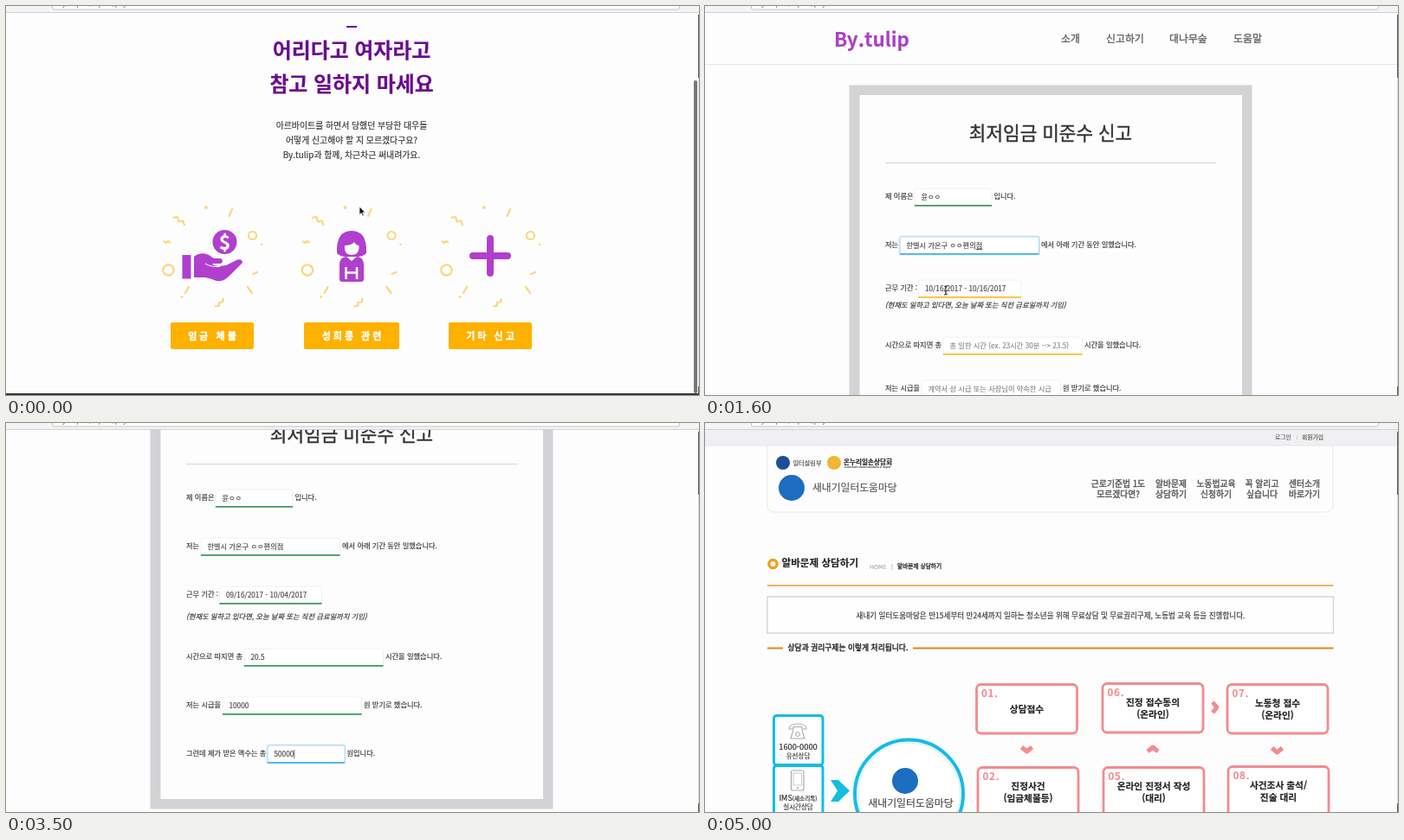
Animation, 800 px wide and 450 px high, one loop 5.1 s. Source, as an HTML page:

```html
<!DOCTYPE html>
<html lang="ko">
<head>
<meta charset="utf-8">
<title>신고서 작성</title>
<style>
html, body { margin: 0; width: 100%; height: 100%; overflow: hidden; background: #fefdfe; }
svg { display: block; width: 800px; height: 450px; font-family: "Noto Sans CJK KR", "Noto Sans", sans-serif; }
text { white-space: pre; stroke-width: .15px; stroke-linejoin: round; }
.m { text-anchor: middle; }
.b { font-weight: 700; }
.w { stroke-width: .4px; }
.i { font-style: italic; }
.s { letter-spacing: 3px; }
.h { font-family: "Liberation Sans", Arial, sans-serif; stroke-width: 0; }
</style>
</head>
<body>
<svg id="stage" viewBox="0 0 800 450"></svg>
<script>
const LOOP = 5100, STEP = 100;
const stage = document.getElementById('stage');
const SITE = 'By.tulip', CENTER = '새내기일터도움마당';
const PERSON = '윤ㅇㅇ', SHOP = '한별시 가온구 ㅇㅇ편의점';
const PURPLE = '#b03fce', AMBER = '#ffb100', PINK = '#f48a8e', CYAN = '#14bde2', INK = '#333';

// Drawing helpers; text is placed by its vertical centre.
const text = (x, y, s, size, fill = INK, cls = '') =>
  `<text x="${x}" y="${y + size * .37}" font-size="${size}" fill="${fill}" stroke="${fill}" class="${cls}">${s}</text>`;
const rect = (x, y, w, h, fill, r = 0, stroke = 'none', sw = 1) =>
  `<rect x="${x}" y="${y}" width="${w}" height="${h}" rx="${r}" fill="${fill}" stroke="${stroke}" stroke-width="${sw}"/>`;
const disc = (x, y, r, fill, stroke = 'none', sw = 1) =>
  `<circle cx="${x}" cy="${y}" r="${r}" fill="${fill}" stroke="${stroke}" stroke-width="${sw}"/>`;
const line = (d, stroke, sw = 1, cap = 'butt') =>
  `<path d="${d}" fill="none" stroke="${stroke}" stroke-width="${sw}" stroke-linecap="${cap}" stroke-linejoin="round"/>`;
const shape = (d, fill) => `<path d="${d}" fill="${fill}"/>`;
const move = (x, y, s) => `<g transform="translate(${x} ${y})">${s}</g>`;

// Linear value between keys [time, ...numbers].
function between(keys, t) {
  let i = keys.length - 1;
  while (i > 0 && keys[i][0] > t) i--;
  const a = keys[i], b = keys[i + 1] || a;
  const k = b === a ? 0 : Math.max(0, (t - a[0]) / (b[0] - a[0]));
  return { row: a, v: [1, 2].map(n => a[n] + (b[n] - a[n]) * k) };
}

const typed = (s, from, to, t) =>
  t < from ? '' : s.slice(0, Math.ceil(s.length * Math.min(1, (t - from + STEP) / (to - from + STEP))));

function chrome() {
  return rect(0, 0, 800, 7, '#f5f4f5') +
    rect(53.5, -10, 724, 14, '#fff', 2, '#c4c4c4') +
    text(60, -3, 'bytulip.kr/report/pay', 8, '#777') +
    line('M0 7.5H800', '#d0d0d2') +
    line('M799.5 10V83M799.5 440V450', '#555') + line('M799.5 83V440', '#ddd');
}

function header() {
  return text(149, 38.5, SITE, 22.4, '#a93fc6', 'b') +
    [[411, '소개'], [463, '신고하기'], [536, '대나무숲'], [610, '도움말']]
      .map(([x, s]) => text(x, 38, s, 11.9, '#666', 'w')).join('') +
    line('M0 67.5H799', '#e3e3e5');
}

function button(x, y, w, s, filled = true) {
  return rect(x, y, w, 31, filled ? AMBER : '#fff', 2, filled ? 'none' : '#f9b945', 1.4) +
    text(x + w / 2 + 1.5, y + 15.5, s, 11, filled ? '#fff' : INK, filled ? 'm b s w' : 'm b s');
}

const confetti = () => {
  const c = '#fcd67c';
  return disc(231, 233, 2, c) + disc(295, 276, 1.3, c) + disc(203, 336.5, 1.4, c) +
    disc(284.5, 265.5, 4.6, 'none', c, 2) + disc(187.5, 305.5, 6.2, 'none', c, 2.2) +
    line('M261 235L257.5 243M211 325L207 332M279 325L284 332M285 310L290 308', c, 2.2, 'round') +
    line('M192.5 245L198 244L199.5 249.5L204.5 248.5L206 254M182 272L185 274L187 272L190 274M241 347.5L245.5 347L246 343L250 342.5L251 338', c, 2.2);
};

const hand = () =>
  rect(203.5, 288, 10, 27.5, PURPLE) +
  shape('M217 290C223 285 231 285 237 290L240 292H248Q252 295 248 298H238Q241 301 246 301L254 300L267 293.5Q273 292 273 297L257 313Q251 319 243 318Q236 315 230 314H217Z', PURPLE) +
  line('M230 298Q236 302 247 301.5', '#fff', 1) +
  disc(252.5, 273, 14, PURPLE) + text(252.5, 273, '$', 23, '#fff', 'm b');

const girl = () =>
  shape('M382 286Q381 260 399 260Q417 260 416 286Q412 290 406 290H392Q386 290 382 286Z', PURPLE) +
  shape('M391 277Q399 277 402 273Q404 277 407.5 277Q408 288 399 288Q390 288 391 277Z', '#fff') +
  shape('M385 300Q385 290 393 290L399 295L405 290Q413 290 413 300V316Q413 319 410 319H388Q385 319 385 316Z', PURPLE) +
  line('M392.5 302V316M405 302V316M392.5 308.5H405', '#fff', 2.6);

function intro() {
  return rect(393, 23, 12, 2, '#6a0b8c') +
    text(399, 51, '어리다고 여자라고', 23.9, '#6a0b8c', 'm b') +
    text(399, 90, '참고 일하지 마세요', 23.9, '#6a0b8c', 'm b') +
    ['아르바이트를 하면서 당했던 부당한 대우들', '어떻게 신고해야 할 지 모르겠다구요?', SITE + '과 함께, 차근차근 써내려가요.']
      .map((s, i) => text(399, 138 + 17 * i, s, 9.9, INK, 'm')).join('') +
    [0, 160.5, 321].map(x => move(x, 0, confetti())).join('') +
    hand() + girl() + line('M539 289H579M559 269V309', PURPLE, 8, 'round') +
    button(190, 366, 96, '임금 체불') + button(344, 366, 110, '성희롱 관련') + button(511, 366, 96, '기타 신고') +
    rect(794, 86, 4, 362, '#777', 2) + rect(0, 448, 800, 2, '#38383a');
}

// Form rows: "on" is focus, "done" is when the row turns green and pushes the rest down.
const ROWS = [
  { y: 220, x: 242, w: 89, label: '제 이름은', tail: '입니다.', hint: '이름', value: PERSON, on: 800, from: 900, to: 1100, done: 1200 },
  { y: 270, x: 225, w: 160.5, label: '저는', tail: '에서 아래 기간 동안 일했습니다.', hint: '지역+가게명 (ex.한별시 가온구 00편의점)', value: SHOP, on: 1200, from: 1300, to: 1600, done: 1700, ime: true },
  { y: 320, x: 246.5, w: 118, label: '근무 기간 :', date: true, on: 1700, done: 1800 },
  { y: 386, x: 275, w: 160.5, label: '시간으로 따지면 총', tail: '시간을 일했습니다.', hint: '총 일한 시간 (ex. 23시간 30분 --> 23.5)', value: '20.5', on: 2600, from: 2700, to: 2900, done: 3000 },
  { y: 436, x: 250, w: 160.5, label: '저는 시급을', tail: '원 받기로 했습니다.', hint: '계약서 상 시급 또는 사장님이 약속한 시급', value: '10000', on: 3000, from: 3100, to: 3200, done: 3300 },
  { y: 486, x: 302, w: 89, label: '그런데 제가 받은 액수는 총', tail: '원입니다.', hint: '받은 금액', value: '50000', on: 3300, from: 3400, to: 3500, done: 3700 }
];

function field(r, y, t) {
  const done = t >= r.done, focus = t >= r.on && !done;
  const edge = done ? '#3b9a5f' : focus ? '#4fb0e6' : '#fbc02d';
  let s = r.date ? (t < 2500 ? '10/16/2017 - 10/16/2017' : '09/16/2017 - 10/04/2017') : typed(r.value, r.from, r.to, t);
  const size = 8.22, tx = r.x + 7.5;
  let out = text(208, y, r.label, size) + text(r.x + r.w + 2.5, y, r.tail || '', size);
  out += focus
    ? rect(r.x, y - 9, r.w, 20, '#fff', 2, '#d3ecfa', 3) + rect(r.x, y - 9, r.w, 20, '#fff', 2, '#9fd4f2', .8)
    : rect(r.x, y - 9, r.w, 20, '#fff', 2, '#ececf0', .8);
  out += line(`M${r.x + .5} ${y + 10.8}h${r.w - 1}`, edge, 1.7, 'round');
  if (!s) return out + text(tx, y + 1, r.hint, size, '#888');
  if (focus && r.ime) s = s.slice(0, -1) + `<tspan text-decoration="underline">${s.slice(-1)}</tspan>`;
  out += text(tx, y + 1, s, size, '#444');
  if (focus && !r.ime && !r.date) {
    const w = [...s].reduce((n, c) => n + (c > '~' ? .92 : c === '.' ? .28 : .555), 0) * size;
    out += line(`M${tx + w + .5} ${y - 4}v10`, '#333', .7);
  }
  return out;
}

function form(t) {
  let push = 0, rows = '';
  for (const r of ROWS) {
    rows += field(r, r.y + push, t);
    if (t >= r.done) push += 6;
    if (r.date) rows += text(208, r.y + 19.5 + push, '(현재도 일하고 있다면, 오늘 날짜 또는 직전 급료일까지 기입)', 8.25, INK, 'i');
  }
  const scroll = between([[0, 0], [1700, 0], [1800, 84], [2500, 84], [2700, 134], [3700, 134], [3900, 190]], t).v[0];
  return move(0, -scroll, header() +
    rect(166.5, 91.5, 465, 459 + push, '#d3d2d5') + rect(178.5, 103, 441.5, 436 + push, '#fefdfe') +
    text(399, 147, '최저임금 미준수 신고', 21.3, INK, 'm w') + line('M208 181.5H590', '#d4d4d6') + rows) +
    (t >= 1800 && t < 2500 ? picker(t) : '');
}

const DAY = 864e5;
const day = (m, d) => Date.UTC(2017, m, d) / DAY;
const stamp = n => {
  const d = new Date(n * DAY), p = v => String(v).padStart(2, '0');
  return `${p(d.getUTCMonth() + 1)}/${p(d.getUTCDate())}/2017`;
};

function month(x, m, start, end) {
  const first = day(m, 1), lead = new Date(first * DAY).getUTCDay() || 7;
  const name = ['Sep', 'Oct', 'Nov'][m - 8];
  let out = text(x + 57, 298.5, name + ' 2017', 8.1, INK, 'm b h');
  'Su Mo Tu We Th Fr Sa'.split(' ').forEach((s, i) => out += text(x + 19 * i, 317, s, 8.1, INK, 'm b h'));
  for (let i = 0; i < 42; i++) {
    const n = first - lead + i, d = new Date(n * DAY);
    const cx = x + 19 * (i % 7), cy = 335.5 + 18.45 * Math.floor(i / 7);
    const off = d.getUTCMonth() !== m, pick = !off && (n === start || n === end);
    if (pick) out += rect(cx - 9.5, cy - 9.2, 19, 18.4, '#2276bd', 2);
    else if (!off && n > start && n < end) out += rect(cx - 9.5, cy - 9.2, 19.1, 18.5, '#e8f3f8');
    out += text(cx, cy, d.getUTCDate(), 8.1, pick ? '#fff' : off ? '#999' : INK, pick ? 'm b h' : 'm h');
  }
  return out;
}

function picker(t) {
  const m = t < 2000 ? 9 : 8;
  const start = t < 2100 ? day(9, 16) : day(8, 16);
  const end = t < 2100 ? day(9, 16) : t < 2300 ? start : day(9, 4);
  const input = (x, w, n, edge) => rect(x, 265.5, w, 17.5, '#fff', 2, edge) +
    rect(x + 5, 271, 8, 7.5, '#444', .5) + line(`M${x + 6.5} 269.5v2M${x + 11.5} 269.5v2`, '#444', 1.3) +
    line(`M${x + 5} 273h8`, '#fff', .6) + text(x + 17.5, 274.5, stamp(n), 8.5, '#444', 'h');
  return rect(247, 263, 368, 185, '#0001', 3) + rect(246.5, 261, 367, 184.5, '#fff', 3, '#c4c4c4') +
    shape('M251 261.6L255.5 257L260 261.6Z', '#fff') +
    input(251, 137.5, start, '#5aaee6') + input(396, 139, end, '#ccc') +
    rect(540, 265.5, 32, 17.5, '#20ad55', 2, '#17964a') + text(556, 274.3, 'Apply', 7.4, '#fff', 'm b h') +
    rect(574.5, 265.5, 34, 17.5, '#fff', 2, '#ccc') + text(591.5, 274.3, 'Cancel', 7.3, INK, 'm h') +
    line('M265.5 295.5L262 298.5L265.5 301.5M521.5 295.5L525 298.5L521.5 301.5', INK, 1.6) +
    month(264.5, m, start, end) + month(408, m + 1, start, end);
}

function result() {
  const lines = [
    `제 이름은 ${PERSON}입니다.`,
    `저는 ${SHOP}에서 2017년 9월 16일부터 2017년 10월 4일까지 일을 했습니다.`,
    '전체 20.5시간을 일했으며 약속한 시급은 10,000원이므로, 총 205,000원을 받아야 합니다.',
    '그런데 제가 받은 액수는 50,000원입니다.',
    `따라서 155,000원을 ${SHOP}(으)로부터 받을 수 있도록 선처해주세요.`
  ];
  const notes = [
    `아래 "신고하기" 버튼을 누르면 ${CENTER}의 온라인 상담신청 페이지로 연결됩니다.`,
    `적어주신 내용은 별도의 저장이 되지 않으니 "복사하기" 버튼을 눌러 작성된 내용을 복사하시고, ${CENTER} 페이지에서 온`,
    '라인 상담 신청시 적어야 하는 "내용" 칸에 붙여 넣어 주세요.'
  ];
  return header() + line('M330 115.5H166.5V267.5H631.5V115.5H468', '#fbb940', 1.6) +
    text(399.5, 118, '작성 내용', 20.4, '#fbac1c', 'm b s') +
    lines.map((s, i) => text(191, 163 + 19.1 * i, s, 9.37)).join('') +
    rect(166, 303, 466, 55.5, '#dbf2db', 2) +
    notes.map((s, i) => text(176, 319 + 12 * i, s, 8.24, '#3c763d', 'w')).join('') +
    button(284, 388, 92.5, '복사하기') + button(390.5, 388.5, 122, '신고하러 가기', false);
}

function step(x, y, no, ...lines) {
  return rect(x + 1.5, y + 1.5, 116, 56.5, '#fff', 5, PINK, 2.8) +
    `<g letter-spacing=".8">${text(x + 7, y + 11.5, no + '.', 11.5, PINK, 'b')}</g>` +
    lines.map((s, i) => text(x + 59.5, y + 30 + (i - (lines.length - 1) / 2) * 14.5, s, 10.7, '#222', 'm b')).join('');
}

const chevron = (x, y, turn) =>
  `<g transform="translate(${x} ${y}) rotate(${turn})">${line('M-6 -3L0 2L6 -3', PINK, 5)}</g>`;

function center() {
  const menu = [[477, '근로기준법 1도', '모르겠다면?'], [538, '알바문제', '상담하기'], [590, '노동법교육', '신청하기'],
    [643, '꼭 알리고', '싶습니다'], [692, '센터소개', '바로가기']];
  return rect(0, 8, 799, 18, '#f0eff1') + line('M0 26H799', '#e4e3e6') +
    text(658, 16, '로그인', 6.8, '#555') + text(683, 16, '|', 5, '#bbb') + text(689, 16, '회원가입', 6.8, '#555') +
    line('M72 26V95Q72 103 80 103H717Q725 103 725 95V26', '#e7e7ea') +
    disc(90, 46, 8, '#1d4f97') + text(101.5, 46, '일터살림부', 7.2, '#444') +
    disc(149, 46, 8, '#f2b632') + text(160, 45, '온누리일손상담회', 7.6, '#222', 'b') +
    text(160.5, 51, 'Onnuri Work Counsel Association of Helpers', 2.6, '#555') +
    disc(100, 75, 15, '#1d6dc0') + text(124, 75, CENTER, 11.8, '#555') +
    menu.map(([x, a, b]) => text(x, 70, a, 9.8, '#555', 'm w') + text(x, 82, b, 9.8, '#555', 'm w')).join('') +
    disc(78.5, 163, 4.6, '#fff', '#f2a01c', 3.4) + text(88.5, 162, '알바문제 상담하기', 11.6, '#222', 'b') +
    text(190, 166, 'HOME', 6.8, '#aaa') + text(215, 165.5, '|', 6.5, '#aaa') + text(222, 165.5, '알바문제 상담하기', 6.7, '#444', 'w') +
    line('M72 188H725.5', '#eb9a22', 1.7) +
    rect(72, 201, 653.5, 42, '#fefefe', 0, '#d0d0d8', 1.3) +
    text(399, 222.5, '새내기 일터도움마당은 만15세부터 만24세까지 일하는 청소년을 위해 무료상담 및 무료권리구제, 노동법 교육 등을 진행합니다.', 8.57, INK, 'm') +
    line('M72 260.5H90M240 260.5H725.5', '#ea8417', 2.2) + text(95.5, 260, '상담과 권리구제는 이렇게 처리됩니다.', 8.78, '#222', 'w') +
    step(312, 301, '01', '상담접수') + step(457.5, 300, '06', '진정 접수동의', '(온라인)') + step(601.5, 301, '07', '노동청 접수', '(온라인)') +
    step(313.5, 397, '02', '진정사건', '(임금체불등)') + step(458.5, 397, '05', '온라인 진정서 작성', '(대리)') + step(602.5, 396, '08', '사건조사 출석/', '진술 대리') +
    chevron(371.5, 378, 0) + chevron(517, 377, 180) + chevron(589, 329, -90) + chevron(660.5, 379, 0) +
    rect(79.5, 338.5, 56.5, 57, '#fff', 3, CYAN, 3) + rect(79.5, 396.5, 56.5, 70, '#fff', 3, CYAN, 3) +
    line('M97 354Q97 348 107 348Q117 348 117 354H112V351.5H102V354ZM102 355L99 365H115L112 355', '#aaa', 1.1) + disc(107, 360, 2.5, 'none', '#aaa') +
    text(107.5, 374.5, '1600-0000', 9.3, '#222', 'm') + text(107.5, 385, '유선상담', 7.5, '#333', 'm') +
    rect(99.5, 402, 14.5, 23, '#fff', 2, '#aaa', 1.2) + rect(102, 405, 9.5, 14, 'none', 0, '#bbb', .8) + disc(107, 422, 1.1, '#aaa') +
    text(107.5, 434, 'IMS<tspan font-size="6.6">(새소리톡)</tspan>', 9, '#222', 'm') + text(107.5, 444.5, '실시간상담', 7.5, '#333', 'm') +
    shape('M145 413H154L167 425.5L154 438H145L153 425.5Z', CYAN) +
    disc(235.5, 429, 62.5, '#fff', CYAN, 4) + disc(235.5, 429, 59, 'none', '#d9eef3', 1.2) +
    disc(231, 414, 15, '#1d6dc0') + text(237.5, 439.5, CENTER, 11.9, '#444', 'm');
}

const CURSORS = {
  arrow: `<path d="M0 0V9.5L2.2 7.5L3.7 11L5.2 10.3L3.7 7H6.6Z" fill="#111" stroke="#fff" stroke-width=".7"/>`,
  hand: `<path d="M-1 1Q0 -.5 1 1V4.5L5.5 5.5Q6.5 6 6 8L5 11H-.5L-3.5 7Q-3.5 5.5 -1 7Z" fill="#fff" stroke="#222" stroke-width="1"/><path d="M1.5 7V9.5M3.3 7V9.5" stroke="#555" stroke-width=".6"/>`,
  beam: `<path d="M-2 -5Q0 -5 0 -3.5Q0 -5 2 -5M0 -4V4M-2 5Q0 5 0 3.5Q0 5 2 5M-1 1H1" fill="none" stroke="#222" stroke-width="1"/>`
};
const PATH = [
  [0, 408, 232, 'arrow'], [200, 238, 380, 'hand'], [400, 250, 374, 'hand'], [500, 255, 371, 'hand'], [600, 255, 371, 'hand'],
  [800, 285, 221, 'beam'], [1000, 285, 221, ''], [1200, 300, 276, 'beam'], [1300, 300, 276, ''], [1500, 278, 329, 'beam'],
  [1700, 278, 329, 'beam'], [1900, 264, 297, 'hand'], [2000, 264, 297, 'hand'], [2100, 378, 372, 'hand'], [2300, 465, 353, 'hand'],
  [2400, 550, 277, 'hand'], [2500, 550, 277, 'arrow'], [2600, 340, 272, 'beam'], [2700, 340, 272, ''],
  [3700, 390, 400, 'arrow'], [3900, 399, 410, 'hand'], [4000, 399, 408, 'arrow'], [4100, 335, 402, 'hand'],
  [4200, 335, 402, 'hand'], [4400, 470, 410, 'hand'], [4600, 470, 410, '']
];

function scene(t) {
  const page = t < 400 ? intro() : t < 4000 ? form(t) : t < 4600 ? result() : center();
  const { row, v } = between(PATH, t);
  return rect(0, 0, 800, 450, '#fefdfe') + page + chrome() + move(v[0], v[1], CURSORS[row[3]] || '');
}

let shown = -1, t0;
function tick(now) {
  t0 ??= now;
  const t = Math.floor((now - t0) % LOOP / STEP) * STEP;
  if (t !== shown) stage.innerHTML = scene(shown = t);
  requestAnimationFrame(tick);
}
stage.innerHTML = scene(0);
requestAnimationFrame(tick);
</script>
</body>
</html>
```
